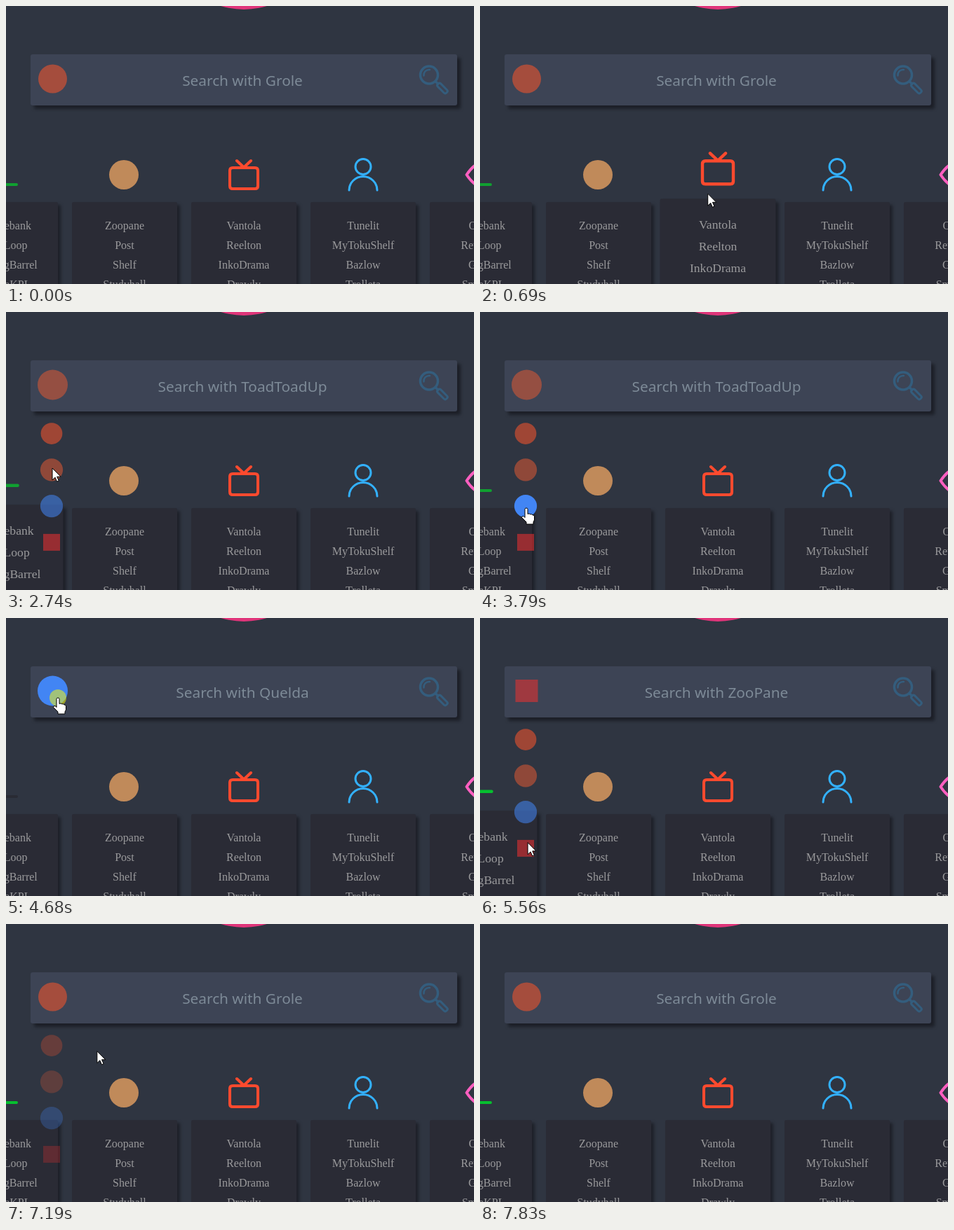
An HTML page for the animation above (8300 ms loop, 667 px wide and 397 px high).

```html
<!DOCTYPE html>
<html lang="en">
<head>
<meta charset="utf-8">
<title>Start page</title>
<style>
  html, body { margin: 0; width: 100%; height: 100%; overflow: hidden; background: #2f3541; }
  svg { display: block; width: 100%; height: 100%; }
  .bar { filter: drop-shadow(5px 5px 2px #1c1f27); }
  .card { fill: #2a2b35; filter: drop-shadow(4px 4px 2px #1d2028); }
  .link { font: 16px "Liberation Serif", "Times New Roman", serif; fill: #9a9a9c; text-anchor: middle; }
  .query { font: 20.8px "Noto Sans", "Open Sans", sans-serif; fill: #7d8a97; text-anchor: middle; }
  .line { fill: none; stroke-width: 4; stroke-linecap: round; stroke-linejoin: round; }
  .pointer { fill: #fff; stroke: #000; stroke-width: 1; stroke-linejoin: round; }
</style>
</head>
<body>
<svg id="stage" viewBox="0 0 667 397">
  <circle cx="339" cy="-106" r="111" fill="#e0357a"/>
  <rect class="bar" x="35" y="69" width="608" height="73" rx="3" fill="#3d4455"/>
  <text id="query" class="query" x="337" y="114"></text>
  <g class="line" stroke="#345d7d" transform="translate(603 98.5) rotate(45)" style="stroke-width:3.5">
    <circle r="12.5"/>
    <path d="M-7.5 1A7.5 7.5 0 0 1 1 -7.5" transform="rotate(-45)" style="stroke-width:2.5"/>
    <path d="M13 0H18"/>
    <rect x="18" y="-3" width="17.5" height="6" rx="2.5" style="stroke-width:3"/>
  </g>
  <g id="columns"></g>
  <g id="menu"></g>
  <g id="logo"></g>
  <g id="cursor">
    <circle id="press" r="12" fill="#ff0" opacity=".5"/>
    <path id="arrow" class="pointer" d="M0 0V17L4 13.2L6.6 19.2L9.3 18L6.7 12.2H12Z"/>
    <path id="hand" class="pointer" d="M-2 1.5Q-2 0 0 0T2 1.5V8.5Q4 7 6 9Q8 8 9 10Q11.5 9.5 11.5 12V17L10 20V23H0V20L-6.5 13.5Q-6 11 -4 11.5L-2 13.5Z"/>
  </g>
</svg>
<script>
const LOOP = 8300, ENTER = 340, LEAVE = 7700;
const DIM = 0.55, ORIGIN_Y = 328;
const $ = id => document.getElementById(id);

function add(parent, tag, attrs, text) {
  const el = document.createElementNS("http://www.w3.org/2000/svg", tag);
  for (const key in attrs) el.setAttribute(key, attrs[key]);
  if (text) el.textContent = text;
  parent.append(el);
  return el;
}

const engines = [
  { name: "Grole", color: "#fb542b", round: true, size: 41 },
  { name: "ToadToadUp", color: "#de5833", round: true, size: 43 },
  { name: "Quelda", color: "#4285f4", round: true, size: 43 },
  { name: "ZooPane", color: "#f03030", round: false, size: 32 }
];

const columns = [
  { x: -1, links: ["Puzzlebank", "FernLoop", "HelpingBarrel", "NativeKPL"],
    color: "#10a030", icon: "M-23 227L-9 241L-23 255M-1 255H15" },
  { x: 169, links: ["Zoopane", "Post", "Shelf", "Studyhall"], dot: "#c08a5a" },
  { x: 339, links: ["Vantola", "Reelton", "InkoDrama", "Drawly"],
    color: "#ff4a2e", icon: "M323 231H355Q359 231 359 235V257Q359 261 355 261H323Q319 261 319 257V235Q319 231 323 231ZM329 221L339 230.5L349 221" },
  { x: 509, links: ["Tunelit", "MyTokuShelf", "Bazlow", "Trolleta"],
    color: "#33b1ff", width: 3, icon: "M498 229.5a11 11 0 0 1 22 0a11 11 0 0 1 -22 0M489 263a20 19.5 0 0 1 40 0" },
  { x: 679, links: ["Opalo", "Retouchy", "Glyph", "SmallPix"],
    color: "#ff5fc0", icon: "M656.5 241Q667 225 679 223Q691 225 701.5 241Q691 257 679 259Q667 257 656.5 241Z" }
];

// Pointer path: time, x, y
const path = [
  [340, 520, 397], [1110, 70, 100], [1250, 66, 96], [1850, 66, 96],
  [2470, 66, 223], [2800, 66, 223], [3100, 73, 107], [3380, 73, 107],
  [3790, 66, 280], [4130, 66, 280], [4680, 74, 114], [4820, 74, 114],
  [5230, 68, 326], [5510, 68, 326], [6050, 70, 112], [6190, 70, 112],
  [6390, 68, 155], [6600, 70, 170], [7070, 70, 170], [7700, 690, 290]
];
const presses = [[1720, 1850], [2600, 2740], [3230, 3380], [3990, 4130],
  [4680, 4820], [5370, 5510], [6050, 6190], [6930, 7070]];
const opens = [[1850, 2740], [3380, 4130], [4820, 5510], [6190, 7070]];
const picks = [[0, 0], [2740, 1], [4130, 2], [5510, 3], [7070, 0]];

const clamp = v => Math.max(0, Math.min(1, v));
const within = (spans, t) => spans.some(([a, b]) => t >= a && t < b);

function badge(parent, engine, x, y, scale) {
  const d = engine.size * scale;
  return engine.round
    ? add(parent, "circle", { cx: x, cy: y, r: d / 2, fill: engine.color })
    : add(parent, "rect", { x: x - d / 2, y: y - d / 2, width: d, height: d, fill: engine.color });
}

for (const col of columns) {
  col.el = add($("columns"), "g", {});
  add(col.el, "rect", { class: "card", x: col.x - 75, y: 280, width: 150, height: 160, rx: 2 });
  col.links.forEach((name, i) =>
    add(col.el, "text", { class: "link", x: col.x, y: 319 + 28 * i }, name));
  if (col.dot) add(col.el, "circle", { cx: 168, cy: 241, r: 21, fill: col.dot });
  else col.mark = add(col.el, "path", {
    class: "line", d: col.icon, stroke: col.color, style: `stroke-width:${col.width || 4}` });
}

engines.forEach((engine, i) => {
  engine.y = 173.5 + 51.8 * i;
  engine.item = badge($("menu"), engine, 65, engine.y, 0.75);
  engine.logo = badge($("logo"), engine, 66.5, 104, 1);
});

function pointer(t) {
  if (t < ENTER || t >= LEAVE) return null;
  const i = path.findIndex(p => p[0] > t);
  const [t0, x0, y0] = path[i - 1], [t1, x1, y1] = path[i];
  const k = (t - t0) / (t1 - t0), e = k * k * (3 - 2 * k);
  return { x: x0 + (x1 - x0) * e, y: y0 + (y1 - y0) * e };
}

function overColumn(col, t) {
  const p = pointer(t);
  return p && p.y > 216 && Math.abs(p.x - col.x) < 75 && !(col.x < 0 && within(opens, t));
}

// Grows at once under the pointer, then shrinks back over 120 ms
function growth(col, t) {
  for (let lag = 0; lag < 120; lag += 4) if (overColumn(col, t - lag)) return 1 - lag / 120;
  return 0;
}

function menuAlpha(t) {
  return Math.max(...opens.map(([a, b]) =>
    Math.min(clamp((t - a) / 120), clamp(1 - (t - b - 60) / 120))));
}

function draw(t) {
  const p = pointer(t), open = within(opens, t);
  const pick = picks.filter(s => t >= s[0]).pop()[1];
  const onLogo = p && Math.abs(p.x - 66.5) < 21.5 && Math.abs(p.y - 104) < 21.5;
  let hand = onLogo;

  $("query").textContent = "Search with " + engines[pick].name;
  engines.forEach((engine, i) => {
    const onItem = open && p && Math.abs(p.x - 65) < 17 && Math.abs(p.y - engine.y) < 17;
    hand = hand || onItem;
    engine.item.setAttribute("opacity", onItem ? 1 : DIM);
    engine.logo.setAttribute("opacity", i !== pick ? 0 : onLogo ? 1 : DIM);
  });
  $("menu").setAttribute("opacity", menuAlpha(t));

  for (const col of columns) {
    const s = 1 + 0.1 * growth(col, t);
    col.el.setAttribute("transform",
      `translate(${col.x} ${ORIGIN_Y}) scale(${s}) translate(${-col.x} ${-ORIGIN_Y})`);
  }
  columns[0].mark.setAttribute("stroke", t < 4130 ? "#10a030" : t < 5510 ? "#292b34" : "#06c02f");

  $("cursor").setAttribute("visibility", p ? "visible" : "hidden");
  if (p) $("cursor").setAttribute("transform", `translate(${p.x} ${p.y})`);
  $("press").setAttribute("opacity", within(presses, t) ? 0.5 : 0);
  $("arrow").setAttribute("opacity", hand ? 0 : 1);
  $("hand").setAttribute("opacity", hand ? 1 : 0);
}

const start = performance.now();
function tick() {
  draw((performance.now() - start) % LOOP);
  requestAnimationFrame(tick);
}
tick();
</script>
</body>
</html>
```
